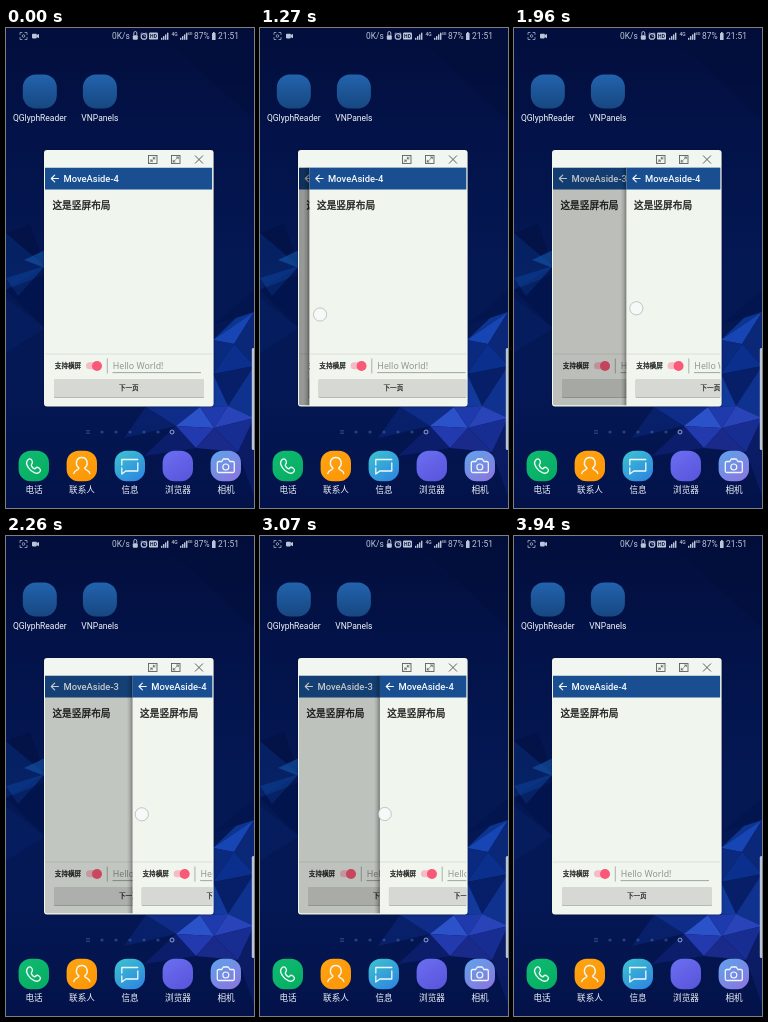
These frames come from a looping animation (248 px wide and 480 px high, 3970 ms). An HTML page with a canvas:

```html
<!DOCTYPE html>
<html lang="zh">
<head>
<meta charset="utf-8">
<title>Swipe demo</title>
<style>
html, body { margin: 0; width: 100%; height: 100%; overflow: hidden; background: #03144c; }
canvas { display: block; width: 248px; height: 480px; }
</style>
</head>
<body>
<canvas id="stage"></canvas>
<script>
const W = 248, H = 480, LOOP = 3970;
const LATIN = 'Roboto, "Noto Sans CJK SC", "Noto Sans CJK", sans-serif';
const CJK = '"Noto Sans CJK SC", "Noto Sans CJK", sans-serif';
const HINT = '"Noto Sans", "Open Sans", sans-serif';
const PAGE = { x: 39, y: 139.5, w: 167.3, h: 238 };
const stage = document.getElementById('stage');
const dpr = window.devicePixelRatio || 1;
let g;

function surface(canvas) {
  canvas.width = W * dpr;
  canvas.height = H * dpr;
  const ctx = canvas.getContext('2d');
  ctx.scale(dpr, dpr);
  return ctx;
}

function rect(x, y, w, h, fill) {
  g.fillStyle = fill;
  g.fillRect(x, y, w, h);
}

function round(x, y, w, h, r, fill) {
  g.beginPath();
  g.roundRect(x, y, w, h, r);
  g.fillStyle = fill;
  g.fill();
}

function disc(x, y, r, fill, stroke, lw = 1) {
  g.beginPath();
  g.arc(x, y, r, 0, Math.PI * 2);
  if (fill) { g.fillStyle = fill; g.fill(); }
  if (stroke) { g.strokeStyle = stroke; g.lineWidth = lw; g.stroke(); }
}

function path(d, x, y, stroke, lw = 1, fill) {
  g.save();
  g.translate(x, y);
  const p = new Path2D(d);
  if (fill) { g.fillStyle = fill; g.fill(p); }
  if (stroke) {
    g.strokeStyle = stroke;
    g.lineWidth = lw;
    g.lineCap = g.lineJoin = 'round';
    g.stroke(p);
  }
  g.restore();
}

// heft thickens the strokes a little, between regular and bold.
function text(s, x, y, size, color, { font = LATIN, weight = 400, align = 'left', heft = 0 } = {}) {
  g.font = `${weight} ${size}px ${font}`;
  g.textAlign = align;
  g.textBaseline = 'alphabetic';
  g.fillStyle = color;
  g.fillText(s, x, y);
  if (heft) {
    g.strokeStyle = color;
    g.lineWidth = heft;
    g.lineJoin = 'round';
    g.strokeText(s, x, y);
  }
}

function ramp(x0, y0, x1, y1, colors) {
  const grad = g.createLinearGradient(x0, y0, x1, y1);
  colors.forEach((c, i) => grad.addColorStop(i / (colors.length - 1), c));
  return grad;
}

function wallpaper() {
  rect(0, 0, W, H, ramp(0, 0, 0, H, ['#020e3c', '#03134a', '#041854', '#041855', '#031249']));
  const facets = [
    ['M150 0L248 0L248 92Z', '#020b3033'],
    ['M0 205L39 238L0 262Z', '#0a307a66'],
    ['M0 205L24 196L39 238Z', '#020f4088'],
    ['M18 232L39 222L39 240Z', '#1459ac99'],
    ['M0 250L39 238L12 268Z', '#0c3e9499'],
    ['M0 262L39 246L39 300Z', '#020f4466'],
    ['M0 270L39 300L0 325Z', '#08297055'],
    ['M207 297L248 262L248 284Z', '#03124466'],
    ['M207 312L230 290L248 284Z', '#0e3c9ecc'],
    ['M207 312L248 284L228 316Z', '#1746b4'],
    ['M248 284L228 316L248 338Z', '#0b2778'],
    ['M207 312L228 316L207 346Z', '#0a2a80'],
    ['M228 316L207 346L248 338Z', '#0b2f8c'],
    ['M207 346L248 338L222 378Z', '#071f68'],
    ['M248 338L222 378L248 390Z', '#10328f'],
    ['M207 346L222 378L194 379Z', '#123a9c'],
    ['M140 379L194 379L170 398Z', '#1638a4aa'],
    ['M170 398L194 379L208 400Z', '#2c52ca'],
    ['M194 379L222 378L208 400Z', '#1f3aac'],
    ['M222 378L248 390L208 400Z', '#2944b8'],
    ['M170 398L208 400L190 420Z', '#2339ae'],
    ['M208 400L248 390L232 424Z', '#182d92'],
    ['M208 400L190 420L232 424Z', '#1a2a8a'],
    ['M140 379L170 398L118 410Z', '#0c2a8088'],
    ['M170 398L190 420L138 428Z', '#14278488'],
    ['M248 390L232 424L248 468Z', '#12237688']
  ];
  for (const [d, c] of facets) path(d, 0, 0, null, 0, c);
}

function signal(x, c) {
  for (let i = 0; i < 4; i++) rect(x + i * 2, 9.8 - i * 1.7, 1.4, 2 + i * 1.7, c);
}

function statusBar() {
  const c = '#bcc5d6';
  path('M-3.5 -1.5V-3.5H-1.5M1.5 -3.5H3.5V-1.5M3.5 1.5V3.5H1.5M-1.5 3.5H-3.5V1.5', 17.5, 8, c, 0.7);
  disc(17.5, 8, 1.3, null, c, 0.7);
  round(26, 5.8, 4.8, 4.6, 0.8, c);
  path('M0 -1L2.4 -2.2V2.2L0 1Z', 30.6, 8.1, null, 0, c);
  text('0K/s', 106, 11, 8.4, c);
  round(126.8, 7.2, 5, 4.6, 1, c);
  path('M-1.5 0V-2A1.5 1.5 0 0 1 1.5 -2V0', 129.3, 7, c, 0.9);
  disc(138, 8.4, 2.8, null, c, 1.2);
  path('M0 -1.4V0H1.2M-3.2 -2.6L-2 -3.6M3.2 -2.6L2 -3.6', 138, 8.4, c, 0.7);
  round(143, 4.6, 9, 7, 1.2, c);
  text('HD', 147.5, 10.1, 5, '#0a1a44', { weight: 700, align: 'center' });
  signal(155, c);
  text('4G', 165.5, 8, 5, c, { weight: 500 });
  signal(174, c);
  text('4G', 181.5, 6.8, 4, c, { weight: 500 });
  text('87%', 188, 11.2, 8.4, c);
  round(206, 5, 3.6, 7, 0.6, c);
  rect(207, 4, 1.6, 1.2, c);
  text('21:51', 212, 11.2, 8.4, c);
}

function appIcon(x, y, label) {
  round(x - 17, y - 17, 34, 34, 13, ramp(0, y - 17, 0, y + 17, ['#2263ad', '#174781']));
  text(label, x, 93, 8.5, '#f2f5fa', { align: 'center' });
}

function dock() {
  const items = [
    ['电话', '#0fba70', '#05ad62'],
    ['联系人', '#ffa312', '#fd9605'],
    ['信息', '#3bbfd2', '#2e86e0'],
    ['浏览器', '#6a6df0', '#5a55dc'],
    ['相机', '#62a0ea', '#8a76e0']
  ];
  items.forEach(([label, a, b], i) => {
    const x = 27.8 + i * 48;
    round(x - 15.2, 422.8, 30.4, 30.4, 12, ramp(x - 10, 423, x + 10, 453, [a, b]));
    text(label, x + 0.2, 465.2, 8.6, '#eef1f8', { font: CJK, align: 'center' });
  });
  const w = '#eefaf6';
  path('M-6 -6C-3 -9 -1 -5 -1.5 -3C-2 -1.5 -3.5 -1.5 -2 .5C-.5 2.5 1 3.5 2 2C3.5 0 7.5 3 6.5 5C4 10 -3 5.5 -5.5 1.5C-7.5 -1.5 -8 -4 -6 -6Z', 27.8, 438, w, 1.4);
  path('M-8 7.5C-7.5 4 -3 4.5 -2.8 2C-7 -1 -6 -8.5 0 -8.5C6 -8.5 7 -1 2.8 2C3 4.5 7.5 4 8 7.5', 75.8, 438, w, 1.4);
  path('M8 -3V5H-4L-8 8V2M-8 -1V-6.5H8', 123.8, 438, w, 1.3);
  path('M-7 -4.5H-4L-2.5 -7H2.5L4 -4.5H7Q8.5 -4.5 8.5 -3V5Q8.5 6.5 7 6.5H-7Q-8.5 6.5 -8.5 5V-3Q-8.5 -4.5 -7 -4.5Z', 219.8, 438, w, 1.3);
  disc(219.8, 439, 3, null, w, 1.2);
}

function pager() {
  path('M-1.6 -1.2H1.6M-1.6 1.2H1.6', 82, 404, '#4d68a2', 0.7);
  for (let i = 1; i < 6; i++) disc(82 + i * 14, 404, 1.6, '#4a68a688');
  disc(166, 404, 2, null, '#b4c2e2', 0.8);
}

function frameBox() {
  g.save();
  g.shadowColor = 'rgba(0,0,0,.4)';
  g.shadowBlur = 3 * dpr;
  round(38, 122, 169.6, 256.5, 3, '#f2f6f0');
  g.restore();
  const c = '#5c605f';
  const box = x => {
    g.strokeStyle = c;
    g.lineWidth = 0.9;
    g.strokeRect(x, 127.5, 8.5, 8);
  };
  box(142.5);
  path('M.6 -.6L2.6 -2.6M.6 -2.3V-.6H2.3M-.6 .6L-2.6 2.6M-.6 2.3V.6H-2.3', 146.75, 131.5, c, 0.8);
  box(165.5);
  path('M.4 -.4L2.5 -2.5M.8 -2.5H2.5V-.8M-.4 .4L-2.5 2.5M-.8 2.5H-2.5V.8', 169.75, 131.5, c, 0.8);
  path('M-3.7 -3.7L3.7 3.7M3.7 -3.7L-3.7 3.7', 193, 131.5, c, 1);
}

// One app screen, shifted right by dx.
function page(title, dx) {
  const { x, y, w, h } = PAGE;
  const ink = '#181a18';
  g.save();
  g.translate(dx, 0);
  rect(x, y, w, h, '#f0f5ee');
  rect(x, y, w, 22, '#194f91');
  path('M7.2 0H0M3.4 -3.4L0 0L3.4 3.4', 45.3, 150.5, '#f5f8fc', 1.1);
  text(title, 57.5, 153.9, 9.4, '#f7fafd', { weight: 500 });
  text('这是竖屏布局', 46.4, 181, 9.7, ink, { font: CJK, heft: 0.3 });
  rect(x, 325.6, w, 0.8, '#d6dad4');
  text('支持横屏', 48.8, 340.3, 6.6, ink, { font: CJK, heft: 0.25 });
  round(80, 334.3, 14, 7, 3.5, '#f6bcc6');
  disc(91, 338, 5, '#fa5877');
  rect(100.8, 330.5, 0.9, 15, '#a4a8a3');
  text('Hello World!', 106.8, 341.3, 8.8, '#92968f', { font: HINT });
  rect(106.5, 344.3, 88.5, 0.8, '#8c908a');
  round(48, 352, 150, 18, 1, '#b5b9b3');
  round(48, 351, 150, 18, 1, '#d5d8d3');
  text('下一页', 122.8, 362.1, 6.6, ink, { font: CJK, align: 'center', heft: 0.2 });
  g.restore();
}

// Smooth monotone curve through [time, value] knots.
function curve(knots, t) {
  const n = knots.length - 1;
  if (t <= knots[0][0]) return knots[0][1];
  if (t >= knots[n][0]) return knots[n][1];
  const slope = i => (knots[i + 1][1] - knots[i][1]) / (knots[i + 1][0] - knots[i][0]);
  const tangent = i => {
    if (i === 0 || i === n) return 0;
    const a = slope(i - 1), b = slope(i);
    return a * b <= 0 ? 0 : 2 * a * b / (a + b);
  };
  let i = 0;
  while (t > knots[i + 1][0]) i++;
  const h = knots[i + 1][0] - knots[i][0], u = (t - knots[i][0]) / h;
  const u2 = u * u, u3 = u2 * u;
  return knots[i][1] * (2 * u3 - 3 * u2 + 1) + knots[i + 1][1] * (3 * u2 - 2 * u3)
    + h * (tangent(i) * (u3 - 2 * u2 + u) + tangent(i + 1) * (u3 - u2));
}

const SLIDE = [[1060, 0], [1270, 10.5], [1600, 43], [1960, 73.5], [2300, 89], [2560, 95.5], [2720, 95], [3070, 81], [3400, 43.7], [3680, 10], [3820, 0]];
const TOUCH_X = [[1030, 47], [1270, 60], [1600, 92], [1960, 122.3], [2300, 137], [2560, 142.6], [2720, 142], [3070, 124.8], [3400, 85], [3720, 49]];
const TOUCH_Y = [[1030, 288], [1270, 286.5], [1960, 280.3], [2560, 277.3], [3070, 278], [3400, 284.3], [3720, 288]];

const backdrop = document.createElement('canvas');

function drawBackdrop() {
  g = surface(backdrop);
  wallpaper();
  statusBar();
  appIcon(33.8, 63.5, 'QGlyphReader');
  appIcon(93.9, 63.5, 'VNPanels');
  pager();
  dock();
  round(245.8, 320, 4, 102, 1.5, '#b9c5d6');
  frameBox();
}

function draw(t) {
  const { x, y, w, h } = PAGE;
  g.drawImage(backdrop, 0, 0, W, H);
  const dx = curve(SLIDE, t);
  g.save();
  g.beginPath();
  g.roundRect(x, y, w, h, [0, 0, 2, 2]);
  g.clip();
  if (dx > 0) {
    page('MoveAside-3', 0);
    rect(x, y, dx, h, `rgba(0,0,0,${0.4 * (1 - dx / w)})`);
    const edge = x + dx;
    rect(edge - 6, y, 6, h, ramp(edge - 6, 0, edge, 0, ['rgba(0,0,0,0)', 'rgba(0,0,0,.12)', 'rgba(0,0,0,.38)']));
  }
  page('MoveAside-4', dx);
  g.restore();
  if (t >= 1030 && t < 3720) {
    disc(curve(TOUCH_X, t), curve(TOUCH_Y, t), 6.6, 'rgba(246,250,250,.85)', 'rgba(130,136,136,.55)', 0.8);
  }
}

drawBackdrop();
g = surface(stage);
const start = performance.now();
function tick() {
  draw((performance.now() - start) % LOOP);
  requestAnimationFrame(tick);
}
tick();
</script>
</body>
</html>
```
